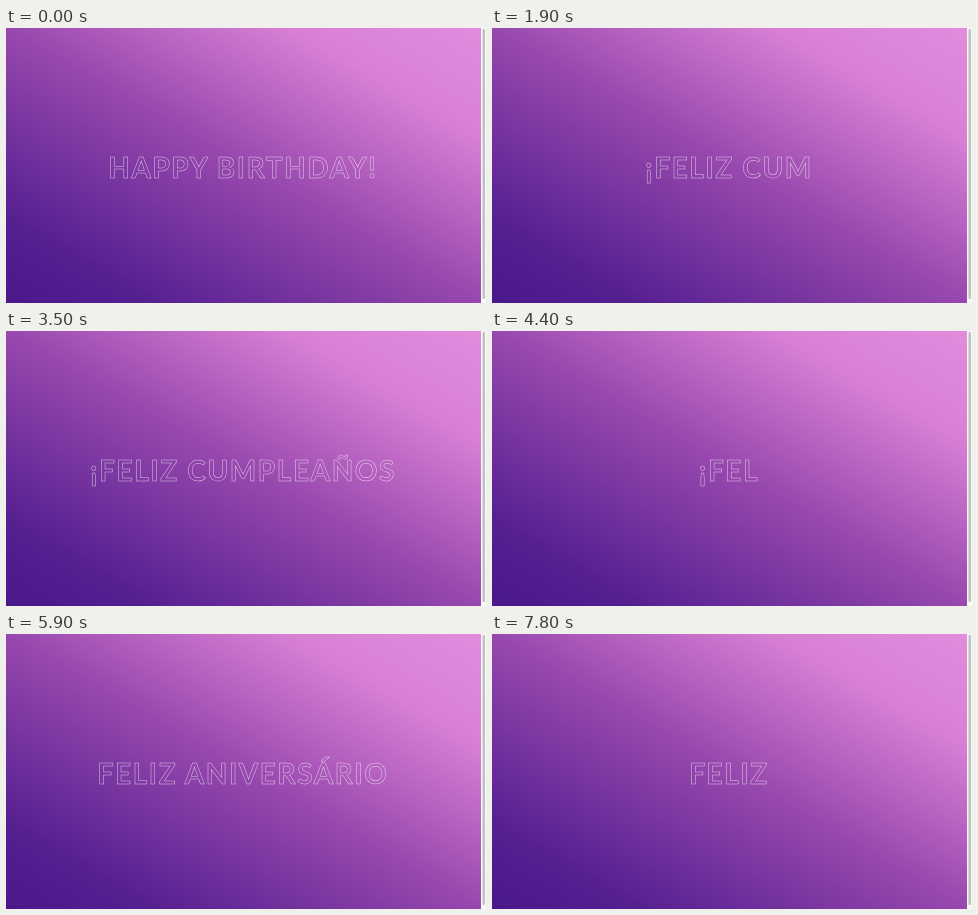
Write an HTML page that moves like this. It is 480x275 px and loops after 8 s.

```html
<!DOCTYPE html>
<html lang="en">
<meta charset="utf-8">
<title>Birthday greeting</title>
<style>
  html, body { margin: 0; width: 100%; height: 100%; overflow: hidden; }
  body { background: #f8f8f8; }
  svg { display: block; width: 480px; height: 275px; }
  text {
    font: 700 28px Lato, sans-serif;
    letter-spacing: 1.6px;
    text-anchor: middle;
    fill: none;
    stroke: #fff;
    stroke-width: .5px;
    stroke-opacity: .75;
  }
  .page {
    width: 475px; height: 275px;
    background: linear-gradient(to top right, #49188a, #551f90 15%, #9748ae 50%, #d980d5 80%, #e28cde);
  }
</style>
<svg viewBox="0 0 480 275">
  <foreignObject width="475" height="275"><div class="page"></div></foreignObject>
  <rect x="476.5" y="1" width="2.5" height="270" rx="1" fill="#c1c1c1"/>
  <text id="line" x="237" y="150"></text>
</svg>
<script>
  const LOOP = 8000, ERASE = 68, TYPE = 72;
  // start of typing and of erasing, in ms
  const phrases = [
    { text: "HAPPY BIRTHDAY!", typeAt: -3000, eraseAt: 90 },
    { text: "¡FELIZ CUMPLEAÑOS!", typeAt: 1112, eraseAt: 3425 },
    { text: "FELIZ ANIVERSÁRIO!", typeAt: 4650, eraseAt: 6975 }
  ];
  const line = document.getElementById("line");

  function visibleText(t) {
    const { text, typeAt, eraseAt } = phrases.findLast(p => t >= p.typeAt);
    const typed = Math.min(text.length, Math.floor((t - typeAt) / TYPE));
    const erased = Math.max(0, Math.floor((t - eraseAt) / ERASE));
    return text.slice(0, Math.max(0, typed - erased)).trim();
  }

  const start = performance.now();
  function draw(now) {
    const text = visibleText(Math.max(0, now - start) % LOOP);
    if (line.textContent !== text) line.textContent = text;
    requestAnimationFrame(draw);
  }
  draw(start);
</script>
</html>
```
